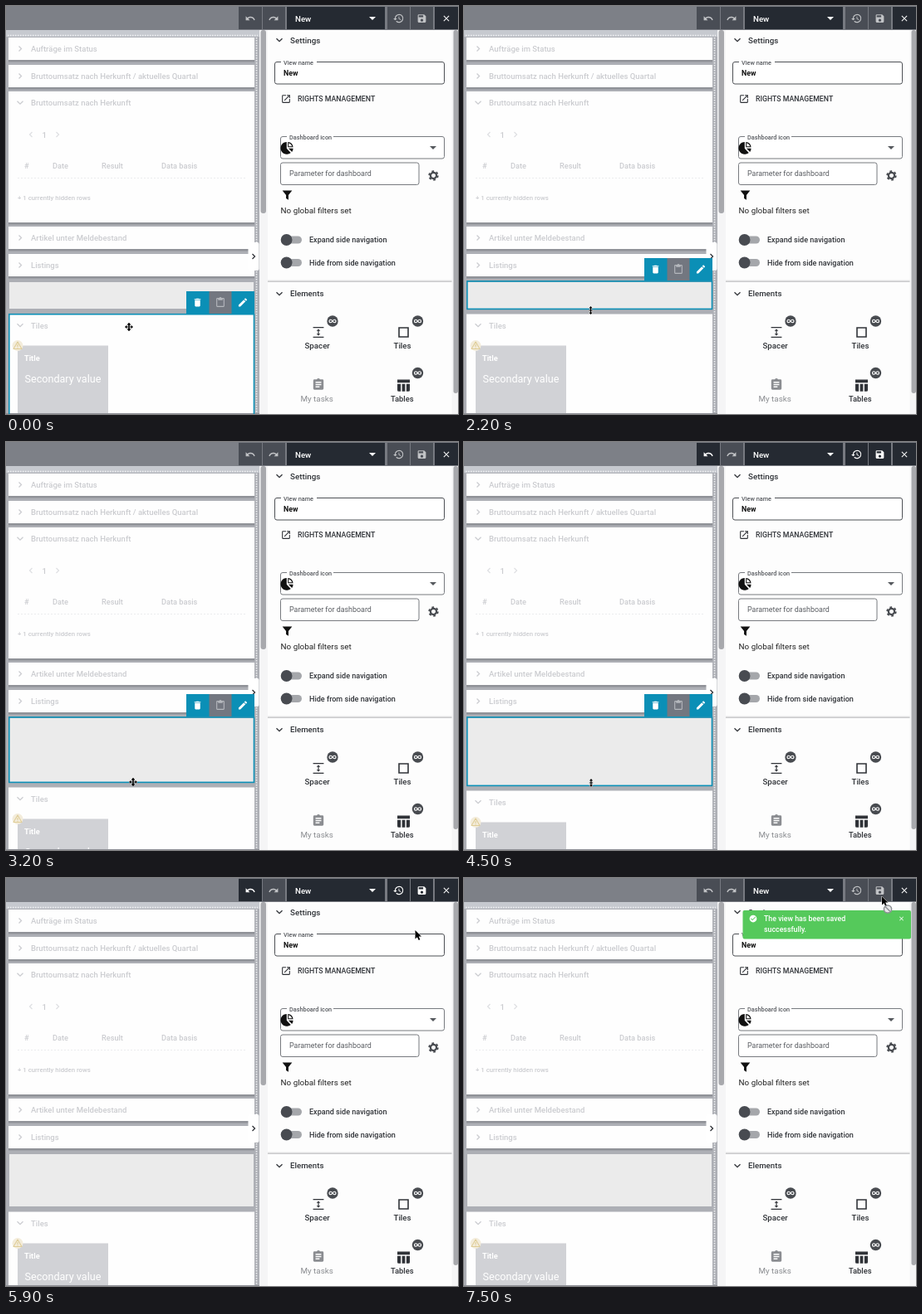
An HTML page that plays this animation: 544 by 492 pixels, repeating every 7.7 s.

```html
<!DOCTYPE html>
<html lang="en">
<head>
<meta charset="utf-8">
<title>Dashboard editor</title>
<style>
  html, body { margin: 0; width: 100%; height: 100%; overflow: hidden; background: #fff; }
  svg { display: block; width: 544px; height: 492px; font-family: Roboto, sans-serif; }
</style>
</head>
<body>
<svg id="stage" viewBox="0 0 544 492"></svg>
<script>
const INK = '#303338', MUTED = '#cbccd0', FAINT = '#dfe0e3', BLUE = '#0b8fb6', DARK = '#252a32';
const LOOP = 7700, STEP = 100;

// Icons on a 24 x 24 grid
const ICONS = {
  undo: 'M12.5 8c-2.65 0-5.05 1-6.9 2.6L2 7v9h9l-3.6-3.6c1.4-1.2 3.1-1.9 5.1-1.9 3.5 0 6.5 2.3 7.6 5.5l2.4-.8C21 11 17.1 8 12.5 8z',
  history: 'M13 3a9 9 0 0 0-9 9H1l4 4 4-4H6a7 7 0 1 1 2 4.9l-1.4 1.5A9 9 0 1 0 13 3zm-1 5v5l4.3 2.5.7-1.2-3.5-2.1V8z',
  save: 'M17 3H5a2 2 0 0 0-2 2v14a2 2 0 0 0 2 2h14a2 2 0 0 0 2-2V7zm-5 16a3 3 0 1 1 0-6 3 3 0 0 1 0 6zm3-10H5V5h10z',
  close: 'M19 6.4L17.6 5 12 10.6 6.4 5 5 6.4l5.6 5.6L5 17.6 6.4 19l5.6-5.6 5.6 5.6 1.4-1.4-5.6-5.6z',
  trash: 'M6 19a2 2 0 0 0 2 2h8a2 2 0 0 0 2-2V7H6zM19 4h-3.5l-1-1h-5l-1 1H5v2h14z',
  paste: 'M19 2h-4.2a3 3 0 0 0-5.6 0H5a2 2 0 0 0-2 2v16a2 2 0 0 0 2 2h14a2 2 0 0 0 2-2V4a2 2 0 0 0-2-2zm0 18H5V4h2v3h10V4h2z',
  tasks: 'M19 3h-4.2a3 3 0 0 0-5.6 0H5a2 2 0 0 0-2 2v14a2 2 0 0 0 2 2h14a2 2 0 0 0 2-2V5a2 2 0 0 0-2-2zm-5 14H7v-2h7zm3-4H7v-2h10zm0-4H7V7h10z',
  edit: 'M3 17.2V21h3.8L17.8 9.9l-3.7-3.7zM20.7 7a1 1 0 0 0 0-1.4l-2.3-2.3a1 1 0 0 0-1.4 0l-1.9 1.8 3.8 3.8z',
  open: 'M19 19H5V5h7V3H5a2 2 0 0 0-2 2v14a2 2 0 0 0 2 2h14a2 2 0 0 0 2-2v-7h-2zM14 3v2h3.6l-9.8 9.8 1.4 1.4L19 6.4V10h2V3z',
  pie: 'M11 2v11l7 7.5A10.5 10.5 0 1 1 11 2zm2 0v9h9a10 10 0 0 0-9-9zm1.5 1.8a8 8 0 0 1 5.700 5.700h-5.700zM14 13l6 6a10 10 0 0 0 2-6z',
  filter: 'M2 3h20l-7.5 9.5V22l-5-3v-6.5z',
  table: 'M2 3h20v5H2zM2 10h5.5v12H4a2 2 0 0 1-2-2zM9.5 10h5v12h-5zM16.5 10H22v10a2 2 0 0 1-2 2h-3.5z',
  spacer: 'M1 1h22v2.2H1zM1 20.8h22V23H1zM12 5l4 4h-3v6h3l-4 4-4-4h3V9H8z',
  check: 'M12 2a10 10 0 1 0 0 20 10 10 0 0 0 0-20zm-2 15l-5-5 1.4-1.4 3.6 3.6 7.6-7.6L19 8z'
};

const rect = (x, y, w, h, fill, more = '') =>
  `<rect x="${x}" y="${y}" width="${w}" height="${h}" fill="${fill}" ${more}/>`;
const circle = (x, y, r, fill, more = '') =>
  `<circle cx="${x}" cy="${y}" r="${r}" fill="${fill}" ${more}/>`;
const text = (x, y, str, size = 9.5, fill = INK, weight = 500) =>
  `<text x="${x}" y="${y}" font-size="${size}" fill="${fill}" font-weight="${weight}">${str}</text>`;
const line = (d, stroke = INK, width = 1.3, more = '') =>
  `<path d="${d}" fill="none" stroke="${stroke}" stroke-width="${width}" ${more}/>`;
const icon = (name, x, y, size, fill = INK, flip = 1) =>
  `<path d="${ICONS[name]}" fill="${fill}" fill-rule="evenodd" transform="translate(${x} ${y}) scale(${flip * size / 24} ${size / 24}) translate(-12 -12)"/>`;
const right = (x, y, c = MUTED) => line(`M${x - 1.5} ${y - 3}l3 3l-3 3`, c);
const left = (x, y, c = MUTED) => line(`M${x + 1.5} ${y - 3}l-3 3l3 3`, c);
const down = (x, y, c = MUTED) => line(`M${x - 3.5} ${y - 1.8}l3.5 3.5l3.5 -3.5`, c);
const caret = (x, y, c) => `<path d="M${x - 4} ${y - 2}h8l-4 4z" fill="${c}"/>`;
const group = (id, body) => `<g id="${id}">${body}</g>`;

const card = (y, h, title, open) =>
  rect(3, y + 1, 296, h + 1.5, '#909298') + rect(3, y, 296, h, '#fefefe') +
  (open ? down : right)(17, y + 13.5) + text(30, y + 17, title, 9.5, MUTED);

const button = (id, x, w, content) => group(id, rect(x, 1, w, 27, DARK) + content);

const field = (x, y, w, h, stroke, label, labelX, labelW) =>
  rect(x, y, w, h, '#fff', `rx="2.5" stroke="${stroke}"`) +
  (label ? rect(labelX - 3, y - 2, labelW + 6, 4, '#fff') + text(labelX, y + 3, label, 7.3, '#55585d') : '');

const toggle = (y, label) =>
  rect(333, y - 4.5, 23, 9, '#a5a7ab', 'rx="4.5"') +
  circle(337.6, y, 6.9, '#484b51') + text(365, y + 3.3, label, 9.05);

const badge = (x, y) =>
  circle(x, y, 6.7, '#484b50') +
  line(`M${x} ${y}c-1.5 -2.5 -4 -2.2 -4 0s2.5 2.5 4 0s4 -2.2 4 0s-2.5 2.5 -4 0`, '#fff', 1.2);

const columns = [[22, '#'], [56, 'Date'], [115, 'Result'], [187, 'Data basis']];

const leftPane =
  rect(0, 0, 305, 492, '#adafb5') + rect(0, 29, 305, 8, '#c6c9cf') +
  line('M2 35.5H303M301.5 38V492', '#eeeff1', 1.6, 'stroke-dasharray="1.5 1.5"') +
  card(38, 27, 'Aufträge im Status') +
  card(71, 27, 'Bruttoumsatz nach Herkunft / aktuelles Quartal') +
  card(103, 158, 'Bruttoumsatz nach Herkunft', true) +
  left(30, 155, FAINT) + text(43.5, 158.5, '1', 9.5, MUTED) + right(62, 155, FAINT) +
  columns.map(([x, s]) => text(x, 196, s, 9.2, MUTED)).join('') +
  line('M14 207.5H288', '#ebecee', 1, 'stroke-dasharray="2 2"') +
  text(14, 234, '+ 1 currently hidden rows', 7.8, MUTED) +
  card(266, 27, 'Artikel unter Meldebestand') +
  card(299, 27, 'Listings') +
  `<rect id="spacer" x="4" y="333" width="294" fill="#ebebeb"/>` +
  group('tiles', card(0, 300, 'Tiles', true) +
    rect(14, 38, 109, 100, '#d1d2d6') + circle(14, 38, 6.5, '#f3ecdb') +
    line('M14 33.5l5 8.5h-10z', '#dfcd98', 1.1, 'stroke-linejoin="round"') + line('M14 36.5v3m0 .7v1', '#dfcd98', 1.1) +
    text(22, 56.5, 'Title', 9.2, '#fff', 700) + text(22.5, 82.5, 'Secondary value', 12.6, '#fff', 400)) +
  rect(0, 491, 305, 1, '#8f9197') +
  rect(305, 29, 10, 463, '#f5f5f6') + rect(306.5, 29, 6.5, 221, '#a8a9ad', 'rx="3"') +
  rect(291.5, 285, 13, 34, '#fff', 'rx="2"') + right(298, 302, INK) +
  `<rect id="outline" x="3.8" width="294.7" fill="none" stroke="${BLUE}" stroke-width="1.6"/>` +
  group('tools', rect(217, 0, 82, 27, BLUE) + rect(244.5, 0, 27, 27, '#737780') +
    icon('trash', 230.5, 13.5, 13, '#fff') + icon('paste', 258, 13.5, 13, '#b5b8bd') + icon('edit', 285, 13.5, 13.5, '#fff'));

const rightPane =
  rect(315, 29, 229, 463, '#fdfdfd') +
  down(329, 41, INK) + text(342, 44.7, 'Settings', 9.8) +
  field(323.5, 67.5, 204, 26.5, '#4d5055', 'View name', 334, 37) + text(334, 84, 'New', 8.8, '#111', 700) +
  icon('open', 337, 112, 13) + text(351, 115.3, 'RIGHTS MANAGEMENT', 8.75) +
  field(330.5, 157.5, 197, 26.5, '#777a7f', 'Dashboard icon', 341, 50) +
  icon('pie', 338.5, 171, 17, '#111') + caret(514, 171, '#55585d') +
  field(330.5, 189, 166.5, 26.5, '#777a7f') + text(341, 205.3, 'Parameter for dashboard', 8.9, '#5a5d62', 400) +
  circle(514.5, 204.5, 3.6, 'none', 'stroke="#484b50" stroke-width="2.2"') +
  circle(514.5, 204.5, 5.2, 'none', 'stroke="#484b50" stroke-width="2" stroke-dasharray="2.7 2.745"') +
  icon('filter', 338.5, 227.8, 14, '#111') + text(330.5, 250, 'No global filters set', 9.9, '#222', 400) +
  toggle(282, 'Expand side navigation') + toggle(309.5, 'Hide from side navigation') +
  rect(315, 330.5, 222, 1, '#e6e6e8') + rect(315, 331.5, 222, 1.5, '#c9cacc') +
  down(329, 347, INK) + text(342, 350.3, 'Elements', 9.7) +
  icon('spacer', 376, 393.5, 14) + text(359.5, 413, 'Spacer', 9.7) + badge(393, 380) +
  line('M473 388h11v11h-11z', INK, 1.6) + text(466.5, 413, 'Tiles', 9.7) + badge(495.5, 380) +
  icon('tasks', 376, 456.5, 16.5, '#8b8d91') + text(354.5, 476.5, 'My tasks', 9.8, '#8b8d91', 400) +
  icon('table', 478.5, 457.3, 18) + text(463, 476.5, 'Tables', 9.4) + badge(495.5, 442.5) +
  rect(536.5, 29, 7.5, 463, '#f5f5f6') + rect(538.5, 29, 5.5, 438, '#a8a9ad', 'rx="2.7"');

const header =
  rect(0, 0, 544, 29, '#7d8087') + rect(280, 0, 264, 29, '#777a81') +
  button('undo', 280, 28, icon('undo', 294, 15, 13, '#fff')) +
  button('redo', 309, 27, icon('undo', 322, 15, 13, '#fff', -1)) +
  button('view', 338, 118, text(348, 18.5, 'New', 9.7, '#fff') + caret(441, 15, '#fff')) +
  button('history', 459, 27, icon('history', 472.5, 15, 14, '#fff')) +
  button('save', 487, 27, icon('save', 500.5, 15, 13, '#fff')) +
  button('close', 516, 28, icon('close', 530, 15, 12, '#fff'));

const toast = group('toast', rect(335.5, 39, 202.5, 34.5, '#55c95b', 'rx="2"') +
  icon('check', 348, 49, 10.5, '#fff') + icon('close', 526.5, 49, 8.5, '#fff') +
  text(361, 52.3, 'The view has been saved', 8.8, '#fff') + text(361, 65.3, 'successfully.', 8.8, '#fff'));

const outlined = 'fill="#000" stroke="#fff" stroke-width="1" paint-order="stroke" stroke-linejoin="round"';
const vertical = 'M0-5L2.2-2.6H.6V2.6H2.2L0 5L-2.2 2.6H-.6V-2.6H-2.2z';
const cursor = group('cursor',
  group('move', `<path ${outlined} d="${vertical}"/><path ${outlined} d="${vertical}" transform="rotate(90)"/><path d="${vertical}"/>`) +
  group('resize', `<path ${outlined} d="${vertical}M-2.2-.6h4.4v1.2h-4.4z"/>`) +
  group('arrow', `<path ${outlined} d="M0 0V10.5L2.4 8.3L4.2 12L5.9 11.2L4.2 7.6H7.5z"/>`) +
  group('blocked', circle(7, 15.5, 4.6, '#e8e8e8', 'stroke="#8d9095" stroke-width="1.5"') + line('M4 12.5l6 6', '#8d9095', 1.5)));

document.getElementById('stage').innerHTML = leftPane + rightPane + header + toast + cursor;

const el = id => document.getElementById(id);
const set = (id, attrs) => { for (const k in attrs) el(id).setAttribute(k, attrs[k]); };
const show = (id, on) => set(id, { visibility: on ? 'visible' : 'hidden' });
const enable = (id, on) => set(id, { opacity: on ? 1 : 0.55 });

// Linear interpolation through [time, ...values] keys
function track(keys, t) {
  const i = keys.findIndex(k => k[0] > t);
  if (i < 0) return keys[keys.length - 1].slice(1);
  const a = keys[i - 1], b = keys[i], p = (t - a[0]) / (b[0] - a[0]);
  return a.slice(1).map((v, j) => v + (b[j + 1] - v) * p);
}

const POINTER = [[0, 148, 387], [400, 143, 346], [1000, 143, 346], [1800, 153, 365], [2100, 152.5, 367], [2200, 152.5, 367],
  [2600, 153, 386], [3000, 153, 404], [3200, 153, 410], [3500, 153, 411], [4500, 153, 411], [4900, 153, 394],
  [5000, 153, 394], [5200, 195, 348], [5500, 350, 200], [5800, 485, 75], [5900, 492.5, 63], [6400, 503, 22]];
const BOTTOM = [[0, 366], [2200, 366], [2600, 385.5], [3000, 404.5], [3200, 411], [3500, 415], [4500, 415], [4900, 397]];

function draw(t) {
  const [x, y] = track(POINTER, t), [bottom] = track(BOTTOM, t);
  const tilesTop = bottom + 5.5;
  const overTiles = t < 1000 && y > 369;
  const top = overTiles ? tilesTop : 331.7;
  const selected = t < 5300;

  set('spacer', { height: bottom - 334 });
  set('tiles', { transform: `translate(0 ${tilesTop})` });
  set('outline', { y: top + 0.2, height: overTiles ? 200 : bottom - top - 0.8 });
  set('tools', { transform: `translate(0 ${Math.round(top) - 28})` });
  show('outline', selected);
  show('tools', selected);

  enable('undo', t >= 3600 && t < 7400);
  enable('redo', false);
  enable('history', t >= 3600 && t < 7000);
  enable('save', t >= 3600 && t < 7000);
  set('toast', { opacity: t < 7400 ? 0 : t < 7500 ? 0.5 : 1 });

  const resize = (t >= 1900 && t <= 2200) || (t >= 3600 && t <= 4500) || (t >= 4900 && t < 5100);
  const arrow = t >= 5100 && x > 304;
  set('cursor', { transform: `translate(${x} ${y})` });
  show('resize', resize);
  show('arrow', arrow);
  show('move', !resize && !arrow);
  show('blocked', t >= 7000);
}

function tick() {
  draw(Math.floor(performance.now() % LOOP / STEP) * STEP);
  requestAnimationFrame(tick);
}
tick();
</script>
</body>
</html>
```
